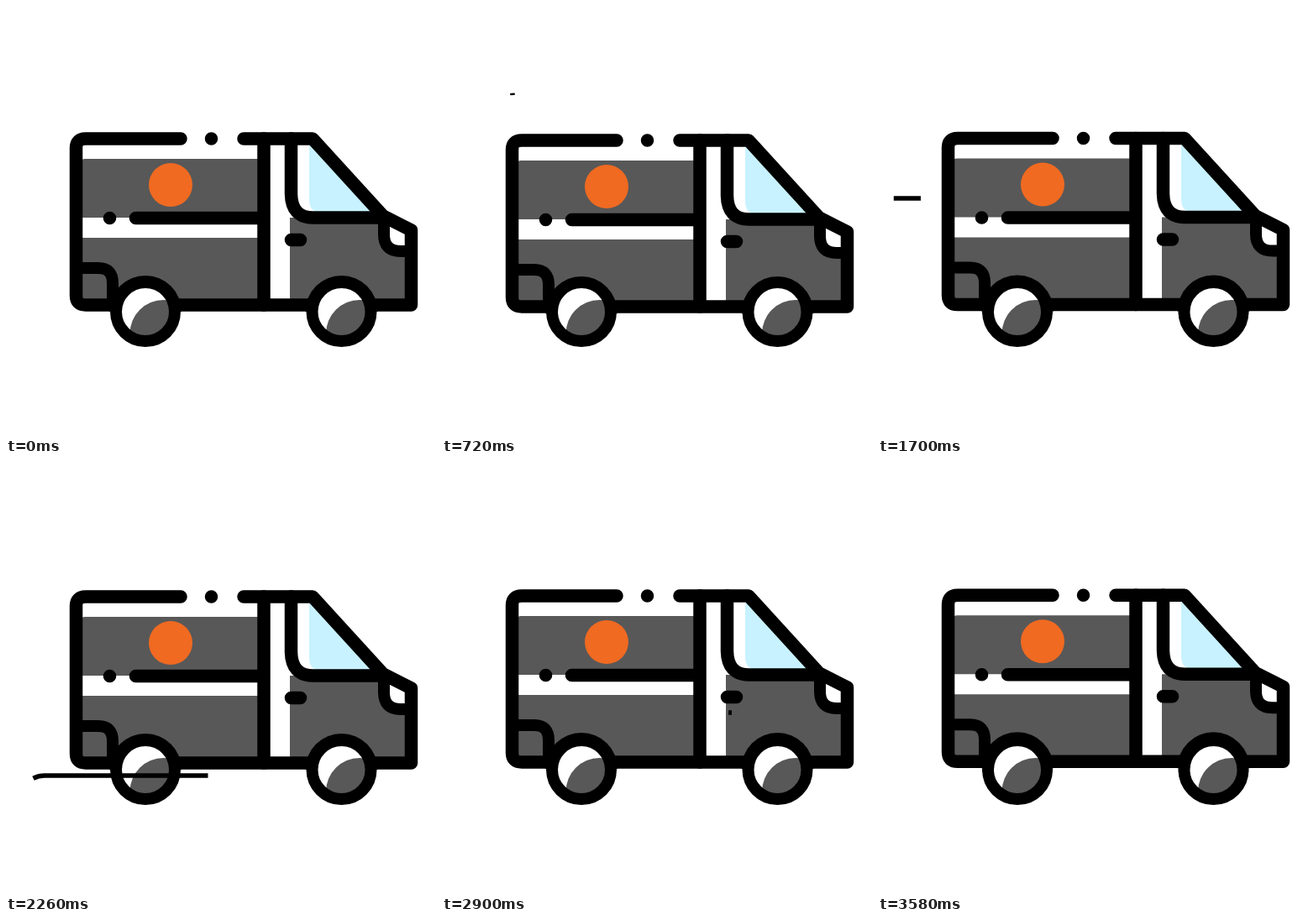
Animation, 512 px wide and 512 px high, one loop 3600 ms. Source, as an HTML page:

```html
<!DOCTYPE html>
<html lang="en">
<head>
<meta charset="utf-8">
<title>Delivery van</title>
<style>
  html, body { margin: 0; width: 100%; height: 100%; overflow: hidden; background: #fff; }
  svg { display: block; width: 100vw; height: 100vh; }
  .ink { fill: none; stroke: #000; stroke-width: 15.5; stroke-linecap: round; stroke-linejoin: round; }
  .wind { fill: none; stroke: #000; stroke-width: 5.5; }
  .grey { fill: #585858; }
</style>
</head>
<body>
<svg viewBox="0 0 512 512">
  <defs>
    <clipPath id="hub"><circle r="29"/></clipPath>
    <g id="wheel">
      <circle r="35" fill="#fff"/>
      <circle class="grey" cx="21.5" cy="26" r="40" clip-path="url(#hub)"/>
      <circle r="35" fill="none" stroke="#000" stroke-width="14"/>
    </g>
  </defs>

  <g id="van">
    <path class="grey" d="M90 252V185Q90 182 94 182H300V252ZM90 276H300V350H90ZM338 252H450V292H476V350H338Z"/>
    <path fill="#c8f2ff" d="M361 165L436 246H375Q361 246 361 230Z"/>
    <circle cx="196" cy="213" r="26" fill="#f06a21"/>
    <g class="ink">
      <path d="M208 158H95Q83.5 158 83.5 169V345Q83.5 356 95 356H482.5V267L449 250L365 158H283"/>
      <path d="M244.5 158h0M123.5 252.5h0M154.5 252.5H307M307 158V356"/>
      <path d="M339.5 158V224Q340 252 366 252H449M339.5 278.5H350.5"/>
      <path stroke-width="14" d="M450 254V272Q450 292 470 292H482M88 312H110Q127 312 127 330V354"/>
    </g>
    <path d="M123 364a43 43 0 0 1 86 0ZM356.5 364a43 43 0 0 1 86 0Z"/>
  </g>

  <use href="#wheel" x="166" y="364"/>
  <use href="#wheel" x="399.5" y="364"/>

  <path class="wind" data-start="20" pathLength="1" d="M348 137H54A30 30 0 1 1 84 107"/>
  <path class="wind" data-start="1145" pathLength="1" d="M386 229H8"/>
  <path class="wind" data-start="2020" pathLength="1" d="M282 371H46A30.5 30.5 0 1 0 76.5 401.5"/>
  <path class="wind" data-start="2897" pathLength="1" d="M345 296H84"/>
</svg>
<script>
const LOOP = 3600, GUST = 800;
const van = document.getElementById('van');
const winds = [...document.querySelectorAll('.wind')];

// Uneven road: [time, vertical shift]
const bumps = [
  [0, 0], [180, 1.6], [360, -2], [540, 0.8], [720, 2], [920, -2], [1040, 0.6],
  [1160, -1.5], [1300, -2], [1500, 1.2], [1700, -0.4], [1880, -1], [2060, 1.2],
  [2260, 0], [2460, -2], [2680, 1], [2900, -1], [3020, -2], [3240, 1.4],
  [3420, 0.2], [3580, -1.7], [LOOP, 0]
];

const easeOut = u => 1 - (1 - u) ** 3;
const easeInOut = u => u < 0.5 ? 4 * u ** 3 : 1 - 4 * (1 - u) ** 3;

function shiftAt(t) {
  const i = bumps.findIndex(b => b[0] > t);
  const [t0, y0] = bumps[i - 1], [t1, y1] = bumps[i];
  const k = (1 - Math.cos(Math.PI * (t - t0) / (t1 - t0))) / 2;
  return y0 + (y1 - y0) * k;
}

function draw(now) {
  const t = now % LOOP;
  van.setAttribute('transform', `translate(0 ${shiftAt(t).toFixed(2)})`);
  for (const wind of winds) {
    const u = (t - wind.dataset.start) / GUST;
    const blowing = u > 0 && u < 1;
    wind.style.visibility = blowing ? 'visible' : 'hidden';
    if (!blowing) continue;
    const head = easeOut(u), tail = easeInOut(u);
    wind.style.strokeDasharray = `${head - tail} 2`;
    wind.style.strokeDashoffset = -tail;
  }
}

const start = performance.now();
function tick() {
  draw(performance.now() - start);
  requestAnimationFrame(tick);
}
tick();
</script>
</body>
</html>
```
